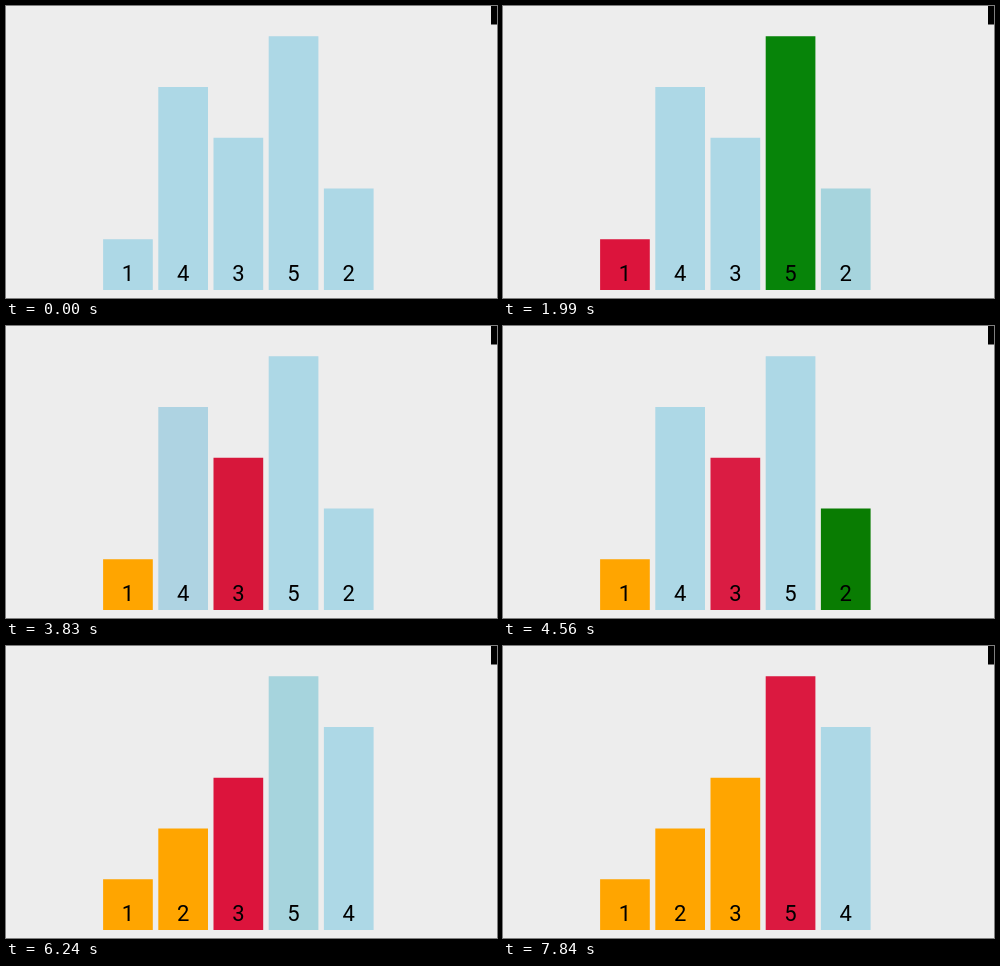
These frames come from a looping animation (491x292 px, 8000 ms). An HTML page with a canvas:

```html
<!DOCTYPE html>
<html lang="en">
<head>
<meta charset="utf-8">
<title>Selection sort</title>
<style>
  html, body { margin: 0; width: 100%; height: 100%; overflow: hidden; background: #ededed; }
  canvas { display: block; }
</style>
</head>
<body>
<canvas id="stage" width="491" height="292"></canvas>
<script>
const ctx = document.getElementById('stage').getContext('2d');
const LOOP = 8000, DURATION = 250;
const LEFT = 97.1, PITCH = 55.2, WIDTH = 49.7, FLOOR = 284, UNIT = 50.75;
const BLUE = [173, 216, 230], RED = [220, 20, 60], GREEN = [0, 128, 0], ORANGE = [255, 165, 0];
const values = [1, 4, 3, 5, 2];

// Each step: start time, then the new colour of each bar by its value.
const steps = [
  [720, { 1: RED }],
  [1040, { 4: GREEN }],
  [1360, { 4: BLUE, 3: GREEN }],
  [1640, { 3: BLUE, 5: GREEN }],
  [1990, { 5: BLUE, 2: GREEN }],
  [2270, { 2: BLUE }],
  [2620, { 1: ORANGE }],
  [2900, { 4: RED }],
  [3220, { 3: GREEN }],
  [3660, { 4: BLUE, 3: RED }],
  [3970, { 5: GREEN }],
  [4250, { 5: BLUE, 2: GREEN }],
  [4560, { 3: BLUE, 2: RED }],
  [4880, { 4: RED }],
  [5600, { 2: ORANGE, 4: BLUE }],
  [5920, { 3: RED }],
  [6240, { 5: GREEN }],
  [6600, { 5: BLUE, 4: GREEN }],
  [7040, { 4: BLUE }],
  [7360, { 3: ORANGE }],
  [7680, { 5: RED }]
];
const SWAP = 5200;

const mix = (a, b, k) => a + (b - a) * k;
const cubicInOut = u => u < 0.5 ? 4 * u ** 3 : 1 - 4 * (1 - u) ** 3;

// Eased progress, held between ticks; `lead` is the age at the first tick.
function progress(elapsed, lead, tick, advance) {
  if (elapsed < 0) return 0;
  const age = lead + Math.floor(elapsed / tick) * advance;
  return cubicInOut(Math.min(1, age / DURATION));
}

function colourOf(value, time) {
  let colour = BLUE;
  for (const [start, changes] of steps) {
    if (time < start) break;
    const next = changes[value];
    if (!next) continue;
    const k = progress(time - start, 54, 70, 75);
    colour = colour.map((c, i) => mix(c, next[i], k));
  }
  return `rgb(${colour.map(Math.round)})`;
}

function slotOf(value, index, time) {
  const k = progress(time - SWAP, 25, 80, 80);
  if (value === 4) return mix(1, 4, k);
  if (value === 2) return mix(4, 1, k);
  return index;
}

function draw(now) {
  const time = now % LOOP;
  ctx.fillStyle = '#ededed';
  ctx.fillRect(0, 0, 491, 292);
  ctx.fillStyle = '#000';
  ctx.fillRect(485, 0, 6, 18.5);
  ctx.font = '22px Roboto, sans-serif';
  ctx.textAlign = 'center';
  values.forEach((value, index) => {
    const x = LEFT + PITCH * slotOf(value, index, time);
    ctx.fillStyle = colourOf(value, time);
    ctx.fillRect(x, FLOOR - UNIT * value, WIDTH, UNIT * value);
    ctx.fillStyle = '#000';
    ctx.fillText(value, x + WIDTH / 2, 275);
  });
  requestAnimationFrame(draw);
}
requestAnimationFrame(draw);
</script>
</body>
</html>
```
